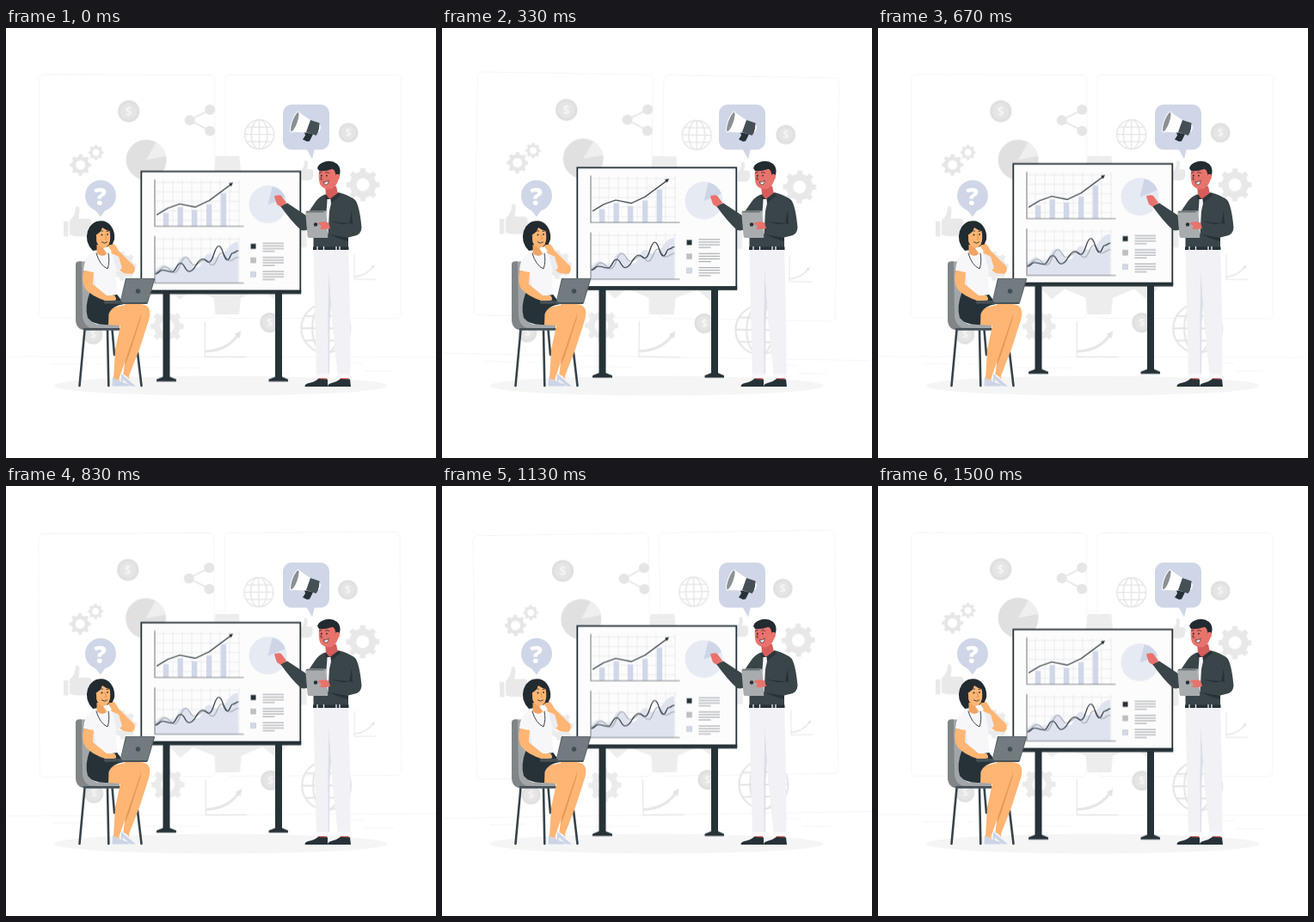
These frames come from a looping animation (500 by 500 pixels, 1.54 s). An HTML page:

```html
<!DOCTYPE html>
<html lang="en">
<head>
<meta charset="utf-8">
<title>Business presentation</title>
<style>
html, body { margin: 0; width: 100%; height: 100%; overflow: hidden; background: #fff; }
svg { display: block; width: 100vw; height: 100vh; }
#back { transform-origin: 250px 226px; }
text { font-family: "Open Sans", sans-serif; font-weight: 700; text-anchor: middle; }
.line { fill: none; stroke-linecap: round; stroke-linejoin: round; }
</style>
</head>
<body>
<svg viewBox="0 0 500 500">
  <g id="back">
    <g fill="none" stroke="#ebebeb" stroke-width=".5">
      <rect x="38.7" y="54.5" width="204" height="283" rx="5"/>
      <rect x="255" y="54.5" width="204" height="283" rx="5"/>
      <path d="M0 382.4H500M416.8 398.5h33M322.5 401.2h8.7M396.6 389.2h19M52.5 390.9h43M104.6 390.9h6.3M131.5 395.1h94"/>
    </g>
    <g id="icons"></g>
    <g fill="#e9e9e9">
      <path id="thumb" d="M67 225h5.5v17.5H67zM74 224q7-6 7-16q5-2 4.500 5l-1 9h12q4 1 2.500 5q2 2 .5 5q1 3-1 5q0 5-4 5.500H80q-4-1-6-2z"/>
      <path d="M343 177v-11q4-4 4-12q4-1 4 4l-1 6h5q3 1 2 4q1 3-1 7l-3 2z"/>
    </g>
    <circle cx="163" cy="153.500" r="23.500" fill="#e0e0e0"/>
    <path d="M163 153.500L174.500 133A23.500 23.500 0 0 1 186 149z" fill="#efefef"/>
    <g fill="#e5e5e5">
      <path d="M237 95L213.500 107.300L237 119.500" fill="none" stroke="#e5e5e5" stroke-width="1.600"/>
      <circle cx="213.500" cy="107.300" r="6"/><circle cx="237" cy="95" r="6"/><circle cx="237" cy="119.700" r="6"/>
    </g>
    <g class="line" stroke="#e6e6e6" stroke-width="1.300">
      <path d="M231.500 342V382.500H279"/>
      <path d="M405 263V292H430" stroke-width="1"/>
      <path d="M405 289q14-1 22-12" stroke-width="1.300"/>
      <path d="M233 376q24-1 37-19" stroke-width="3"/>
    </g>
    <path d="M273.500 352l-1.500 9-6-5zM428.500 275l-1 4.500-3-2.500z" fill="#e3e3e3"/>
  </g>

  <ellipse cx="249.500" cy="416" rx="194" ry="11.500" fill="#f5f5f5"/>

  <g id="board">
    <path d="M182.500 308h8v98l7.500 3v2.500H175V409l7.500-3zM313 308h8v98l7 3v2.500H305.500V409l7.500-3z" fill="#263238"/>
    <rect x="157.300" y="167.300" width="185" height="140" fill="#fcfcfd" stroke="#263238" stroke-width="1.800"/>
    <rect x="156.400" y="305" width="186.800" height="4.800" fill="#263238"/>
    <g id="grid" stroke="#e4e5e8" stroke-width=".7"></g>
    <path d="M183 231v-15.500h6.300V231zM199.500 231v-22.500h6.300V231zM216 231v-19h6.300V231zM233 231v-25.500h6.300V231zM249.800 231v-38.500h6.300V231z" fill="#d0d7e8"/>
    <g id="waves"></g>
    <path d="M173 176.500V231H276.500M173 242.500V297H276.500" fill="none" stroke="#858b90" stroke-width="1.200"/>
    <path class="line" d="M175.500 217.500L188 210L202 205L220 208.700L236 201.300L262 182" stroke="#263238" stroke-width="1.200"/>
    <path d="M264 180.300l-2.200 4.400-2.700-3.600z" fill="#263238"/>
    <circle cx="304.500" cy="205.500" r="22" fill="#e6eaf3"/>
    <path d="M304.500 206L309.800 184.500A22 22 0 0 1 325 197.500z" fill="#cdd5e7"/>
    <g id="legend"></g>
  </g>

  <!-- question -->
  <path d="M103 211l7 8.500 6-8.500z" fill="#cfd6e7"/>
  <circle cx="110" cy="195" r="18" fill="#cfd6e7"/>
  <text x="109.500" y="205.500" font-size="29" fill="#fff" style="font-weight:800">?</text>

  <!-- megaphone -->
  <rect x="322" y="89" width="54" height="52.500" rx="10" fill="#cfd6e7"/>
  <path d="M349 140l7 12.500 3-12.500z" fill="#cfd6e7"/>
  <path d="M347 121l10 2.500-4 8-3 .5-5-2.500 3-4.500z" fill="#263238"/>
  <path d="M340 97.500L354.500 107.500L349 121.500L331.500 121z" fill="#fff"/>
  <ellipse cx="335.800" cy="109.300" rx="3.300" ry="12.400" transform="rotate(20 335.800 109.300)" fill="#8b9093" stroke="#fff"/>
  <path d="M354 107l10.500 3.500q1 8-4 14.500l-11.500-4z" fill="#455056"/>
  <path d="M364.500 112q2.500 3 .5 7l-2.500 3.500q2-5 2-10.500z" fill="#fff"/>

  <!-- chair -->
  <path class="line" d="M91.500 351L85.500 416M118 351L119.300 416M123.500 351L126 380M151.500 365L157.500 416" stroke="#37434a" stroke-width="2.600"/>
  <path d="M81 275.500q0-4 4-4h10l4 66q1 6 7 7h26v6.500H93q-11 0-12-13z" fill="#a2a6a8"/>
  <path d="M81 275.500q0-4 4-4h3l1 64q1 10 9 13l34 1v2H92q-11-1-11-13z" fill="#7f8588"/>
  <rect x="90" y="349" width="44" height="2.500" fill="#455056"/>

  <!-- woman -->
  <g fill="#ffb573">
    <path d="M138 321h17q12 0 12.300 10q0 6-3 14l-9 28-12.500 32-6.500-2 4-32 6-27z"/>
    <path d="M151 325q9 6 4 18l-12 38-5 12 4-27 6-24z" fill="#e39b58"/>
    <path d="M119 345q-2-14 6-20l18-4q16 2 13 15l-14 41-11 32-6-1 2-34 6-28z"/>
    <path d="M130 267q6 1 10 6l9 4q2 7-4 9l-8-1-11-7z"/>
    <path d="M149 277q2 6-2 9l-8-4-17-22q-4-5-1-8l5-1 5 8z"/>
  </g>
  <path d="M98 306q-7 18-3 31 7 9 24 8l.5-12q3-10 18-12l-9-12z" fill="#263238"/>
  <path d="M101 261q9 4 20 0l10 5 3 14-6 4 1 26q-14 3-29-1l2-25-12-2q1-16 11-21z" fill="#f7f7fa"/>
  <path d="M124 263l7 3 4 13-6 5zM102 284l-1 24 5 1z" fill="#ebecf2"/>
  <path d="M90.500 282l11.500 2-1 14 16 13 9 0 2 5-10 2q-19-6-26-15-5-9-1.500-21z" fill="#ffb573"/>
  <!-- head -->
  <path d="M105 225q11-3 17 5 5 7 4 16l-4 10-21 3q-10-10-6-23 3-8 10-11z" fill="#222b30"/>
  <path d="M105.500 252h11l1 10q-5 6-12 0z" fill="#f0a464"/>
  <path d="M104 241q6-3 8-9 4 3 8.500 4 2 9-1 16-4 5-9 3-6-3-6.500-14z" fill="#ffb573"/>
  <path d="M103 240q-4 0-3 5t5 4z" fill="#ffb573"/>
  <path d="M98 230q10 4 6 28l-5-2q-7-14-1-26z" fill="#222b30"/>
  <g class="line" stroke="#263238" stroke-width=".9">
    <path d="M108.500 237q2-2 4-1M117 236.500l2.500-.5M111.500 249q3 2.500 6 0M105 262q4 14 13 18 3-8 1-18"/>
    <path d="M115 240l1.800 5-1.800.6" stroke="#d98545" stroke-width=".7"/>
  </g>
  <circle cx="111.500" cy="240.500" r="1" fill="#263238"/><circle cx="118" cy="240" r=".9" fill="#263238"/>
  <path d="M119 253q5-3 9 1l3 6-7 3-5-5z" fill="#ffb573"/>
  <path d="M113 256l6-2 4 6-6 2z" fill="#fff"/>
  <!-- laptop -->
  <path d="M139 291h33q1.500 0 1 1.500l-8 27q-.5 1.500-2 1.500h-31z" fill="#596368"/>
  <path d="M140.500 291.500h31.500l-8 28h-31.500z" fill="#727b7f"/>
  <circle cx="153.500" cy="306" r="2.700" fill="#414d53"/>
  <path d="M114 317h20l1 2h29v1.800h-48q-2 0-2-1.500z" fill="#455056"/>
  <path d="M117 311l9 0q3 3 1.500 5.500l-6 .5z" fill="#ffb573"/>
  <!-- shoes -->
  <path d="M134 402l6 5q5 5 11 9.500h-6l-9-8-1 8h-1.500zM124 406l6 4 13 4.500v2h-19.500z" fill="#ccd4e7"/>
  <path d="M136.500 402h6l1 6zM124.500 405h6l1.500 6z" fill="#ffb573"/>

  <!-- man -->
  <path d="M361 401h12v10h-9zM388 401h12l-2 10h-9z" fill="#e8736c"/>
  <path d="M363 408l11 .5v8.500h-26.500q0-3 4-4 7-1 11.500-5zM389 408l11 .5 1 8.500h-27q0-3 4-4 6-1 11-5z" fill="#263238"/>
  <path d="M357.500 257h40.500l2 70 .5 80h-14.500l-7-68-3-57-.5 60 .5 65h-15l-2-80z" fill="#f1f1f6"/>
  <path d="M375.500 281l-1.200 55 .5 71h1.200l.5-65 1.500-22z" fill="#dddfe8"/>
  <path d="M360 402h16v5h-15zM385.500 402h15v5h-14.500z" fill="#f8f8fb"/>
  <path d="M312 196q4-3 8-1l6 8-5 6-6-4z" fill="#e8736c"/>
  <path d="M314 197l-2-2.500 7 2 4 4-4 2z" fill="#e8736c"/>
  <path d="M319.500 207.500L327 203.500L349 218L360 202Q365 195 373 193L388 191.500Q400 195 406 200Q411 206 413.500 232Q413 241 404 242L398 243.500V255H357.500V230Q351 237 343 235Q331 224 319.500 207.500z" fill="#3a4549"/>
  <path d="M402 212l-3 15-22-2 21 5 5-2zM364 207l-7 21 1 8 3-14zM376 240l22 4v4q-12-3-22-8z" fill="#263238"/>
  <path d="M371 184h13l2 9-9 8-5-8z" fill="#d65d59"/>
  <path d="M371.500 194l5 5 10.500-8 1.500 4-11 9-7-6z" fill="#2b363b"/>
  <path d="M373.500 199h4l.5 5-2 9-1.500 27-4-10 2.500-22z" fill="#f4f4f9"/>
  <rect x="357" y="254.500" width="41.500" height="3.500" fill="#263238"/>
  <path d="M362 254v4.500M369.500 254v4.500M384 254v4.500M388 254v4.500" stroke="#f1f1f6" stroke-width="1.300"/>
  <!-- head -->
  <path d="M364 166q6-6 14-6l8 5q2 7 0 13-3 8-9 9.500-9 0-12-6-2-7-1-15.500z" fill="#e8736c"/>
  <path d="M362 163q1-4 5-6 10-5 18 1 5 5 3 13l-3 4-2-6q-1-5-4-5-8 3-15 2z" fill="#222b30"/>
  <path d="M384 170q4-1 4 3t-5 5z" fill="#e8736c"/>
  <path d="M369 179q4 1 6-2 0 6-4 5z" fill="#fff" stroke="#263238" stroke-width=".7"/>
  <path class="line" d="M364.500 168.500l2.500-.7M371.500 168q2-1 4 .5M367.500 171l-1.700 4.800 2 .4" stroke="#263238" stroke-width=".8"/>
  <circle cx="366.500" cy="171.500" r=".8" fill="#263238"/><circle cx="373" cy="171.700" r=".9" fill="#263238"/>
  <!-- tablet -->
  <path d="M350 212.500h20.500q2 0 2 2l1.800 29.500h-22q-1.500 0-1.700-2l-2.300-27q0-2.500 1.700-2.500z" fill="#a9acae"/>
  <path d="M349 213h20l1.500 1.500h-21z" fill="#6d7579"/>
  <circle cx="360" cy="228.500" r="2.200" fill="#263238"/>
  <path d="M376 231l25-4 8 8q0 6-7 7l-27-6z" fill="#3a4549"/>
  <path d="M362 227q7-3 13-.5l2 6.500q-8 2-12 .5l2-3z" fill="#e8736c"/>
</svg>
<script>
const $ = id => document.getElementById(id);
const range = n => [...Array(n).keys()];

const ring = (x, y, r) => `M${x - r} ${y}a${r} ${r} 0 1 0 ${2 * r} 0a${r} ${r} 0 1 0 ${-2 * r} 0z`;

function gear(x, y, r, hole, color, n = 8) {
  const step = 2 * Math.PI / n;
  const pts = range(n).flatMap(i => [[-.27, .8], [-.19, 1], [.19, 1], [.27, .8]].map(([a, k]) => {
    const t = (i + a) * step - Math.PI / 2;
    return (x + r * k * Math.cos(t)).toFixed(1) + ' ' + (y + r * k * Math.sin(t)).toFixed(1);
  }));
  return `<path fill-rule="evenodd" fill="${color}" d="M${pts.join('L')}z${ring(x, y, hole)}"/>`;
}

const coin = (x, y, r) => `<circle cx="${x}" cy="${y}" r="${r}" fill="#dfdfdf"/>
  <circle cx="${x}" cy="${y}" r="${r * .77}" fill="#e5e5e5"/>
  <text x="${x}" y="${y + r * .4}" font-size="${r * 1.15}" fill="#f5f5f5">$</text>`;

const globe = (x, y, r, w) => `<g fill="none" stroke="#e4e4e4" stroke-width="${w}">
  <circle cx="${x}" cy="${y}" r="${r}"/><ellipse cx="${x}" cy="${y}" rx="${r * .55}" ry="${r}"/>
  <path d="M${x - r} ${y}h${2 * r}M${x} ${y - r}v${2 * r}M${x - r * .85} ${y - r * .5}h${r * 1.7}M${x - r * .85} ${y + r * .5}h${r * 1.7}"/></g>`;

$('icons').innerHTML =
  gear(257.500, 241, 93, 40, '#ededed') +
  gear(86.500, 159.500, 12.5, 5.5, '#e6e6e6') + gear(104.5, 145, 9, 4, '#e6e6e6') +
  gear(415, 182, 19.5, 7.5, '#e8e8e8') + gear(187.5, 347, 19.5, 8, '#ebebeb') +
  gear(135, 277, 17, 7, '#ebebeb') +
  coin(142.5, 97, 12.7) + coin(398, 121.5, 11.3) + coin(307, 342.5, 11.5) + coin(101.5, 357, 11) +
  globe(294.5, 123.7, 17, 1.3) + globe(372, 349, 28.5, 2);

$('grid').innerHTML = [180, 246].map(y =>
  range(9).map(i => `<path d="M${183 + i * 11} ${y - 3}V${y + 51}"/>`).join('') +
  range(5).map(i => `<path d="M173 ${y + i * 11}H271.500"/>`).join('')).join('');

// smooth curve through extrema, flat at each point
const curve = pts => pts.reduce((d, [x, y], i) => {
  if (!i) return `M${x} ${y}`;
  const [px, py] = pts[i - 1], m = (px + x) / 2;
  return `${d}C${m} ${py} ${m} ${y} ${x} ${y}`;
}, '');
const area = curve([[173.5, 281], [183, 276], [192, 280], [208, 266], [222, 279], [236, 263], [244, 267], [270, 249]]);
const soft = curve([[173.5, 285], [185, 278], [196, 285], [209, 267], [219, 276], [231, 270], [240, 276], [251, 262], [260, 271], [270, 267]]);
const bold = curve([[173.5, 286.5], [182, 282], [193, 284], [203, 274], [213, 283.5], [229, 269], [236, 272.5], [247.500, 254], [257.500, 270], [264, 262], [270, 259.500]]);
$('waves').innerHTML = `<path d="${area}V297H173.500z" fill="#dee3ef"/>
  <path class="line" d="${soft}" stroke="#a5a9af" stroke-width="1.200"/>
  <path class="line" d="${bold}" stroke="#263238" stroke-width="1.200"/>`;

$('legend').innerHTML = ['#263238', '#bdbfc2', '#d3d9e6'].map((c, i) => {
  const y = 251.2 + i * 16.4;
  return `<rect x="284.600" y="${y}" width="6" height="6" fill="${c}" stroke="#aaaeb1" stroke-width=".4"/>
    <path d="M298.500 ${y - .4}h24.500m-24.500 3.100h24.500m-24.500 3.100h24.500m-24.500 3.100h14" fill="none" stroke="#8f9599" stroke-width=".9"/>`;
}).join('');

// 24 steps a second, held on a 10 ms clock
const LOOP = 1540, CYCLE = 1500, LEAD = 35, STEP = 1000 / 24;
const tent = p => 1 - Math.abs(1 - 2 * (p % 1));

function play(el, pose) {
  const keys = range(37).map(k => ({
    offset: Math.round(k * STEP / 10) * 10 / LOOP,
    transform: pose((k * STEP + LEAD) / CYCLE),
    easing: 'step-end'
  }));
  keys.push({ offset: 1, transform: keys[36].transform });
  el.animate(keys, { duration: LOOP, iterations: Infinity });
}

play($('board'), p => `translateY(${-10 * tent(p)}px)`);
play($('back'), p => `rotate(${2 * tent(p + .25) - 1}deg)`);
</script>
</body>
</html>
```
